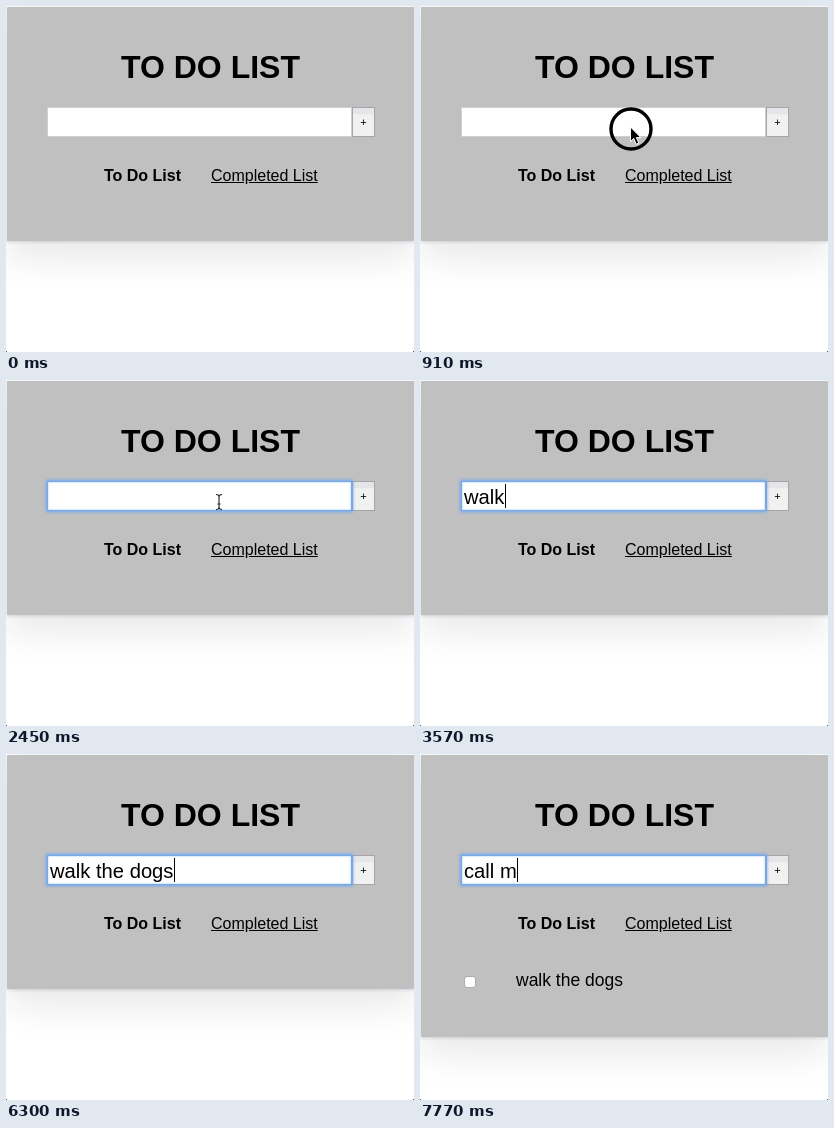
Animation, 408 px wide and 346 px high, one loop 8 s. Source, as an HTML page:

```html
<!DOCTYPE html>
<html lang="en">
<head>
<meta charset="utf-8">
<title>To do list</title>
<style>
  html, body { margin: 0; width: 100%; height: 100%; overflow: hidden; }
  body { background: #fff; font-family: "Liberation Sans", Arial, sans-serif; color: #000; }
  #stage { position: relative; width: 408px; height: 346px; overflow: hidden; }
  #stage * { position: absolute; box-sizing: border-box; white-space: pre; margin: 0; }
  #panel {
    left: 1px; top: 1px; width: 407px; height: 234px; background: #c0c0c0;
    box-shadow: 0 1px 3px rgba(30, 25, 45, .16), 0 16px 34px rgba(30, 25, 45, .1);
  }
  .added #panel { height: 282px; }
  h1 { left: 115px; top: 43px; font: bold 32px/36px "Liberation Sans", Arial, sans-serif; }
  .tab { top: 160px; font-size: 16px; line-height: 20px; }
  #todo { left: 98px; font-weight: bold; }
  #done { left: 205px; text-decoration: underline; }
  #add {
    left: 346px; top: 101px; width: 23px; height: 30px; border: 1px solid #a6a6a6;
    background: linear-gradient(#e6e6ea 20%, #f1f1f1 24%);
    font-size: 11px; line-height: 29px; text-align: center;
  }
  #field { left: 41px; top: 101px; width: 305px; height: 30px; background: #fff; border: 1px solid #cfcfcf; }
  .focus #field { border-color: #76a9ea; box-shadow: 0 0 3px 1px #6ea6ee, inset 0 0 2px #8fbcf2; }
  #line { left: 44px; top: 104px; height: 24px; display: flex; font-size: 20.2px; line-height: 26px; }
  #stage #line * { position: static; }
  #caret { width: 1px; height: 24px; margin-left: .6px; background: #000; visibility: hidden; }
  .item { visibility: hidden; }
  .added .item { visibility: visible; }
  #check { left: 44px; top: 222px; width: 12px; height: 12px; background: #fff; border: 1px solid #aaa; border-radius: 3px; }
  #label { left: 96px; top: 216px; font-size: 17.5px; line-height: 20px; }
  .corner { top: 345px; width: 1px; height: 1px; background: #555; }
  svg { left: 0; top: 0; }
</style>
</head>
<body>
<div id="stage">
  <div id="panel"></div>
  <h1>TO DO LIST</h1>
  <div id="add">+</div>
  <div id="field"></div>
  <div id="line"><span id="text"></span><i id="caret"></i></div>
  <div id="todo" class="tab">To Do List</div>
  <div id="done" class="tab">Completed List</div>
  <div id="check" class="item"></div>
  <div id="label" class="item">walk the dogs</div>
  <div class="corner" style="left:0"></div>
  <div class="corner" style="left:407px"></div>
  <svg width="408" height="346">
    <g id="pointer">
      <circle id="ring" r="20" fill="none" stroke="#000" stroke-width="3.4"/>
      <path id="arrow" d="M-.5-2V12.5L2.8 9.4 5.2 15.2 7.8 14.1 5.4 8.5H9.8Z" fill="#000" stroke="#fff" stroke-width="1"/>
      <path id="beam" d="M-3-7.5Q0-7.5 0-5Q0-7.5 3-7.5M0-5V5M-3 7.5Q0 7.5 0 5Q0 7.5 3 7.5M-1.5 2H1.5" fill="none" stroke="#222" stroke-width="1.1"/>
    </g>
  </svg>
</div>
<script>
const LOOP = 8000, STEP = 70, BLINK = 525;
const FOCUS = 1680, SUBMIT = 6370;
const $ = id => document.getElementById(id);
const show = (id, on) => { $(id).style.visibility = on ? "visible" : "hidden"; };

const entries = [
  { start: FOCUS, text: "walk the dogs",
    keys: [2590, 3150, 3220, 3570, 3780, 3850, 3990, 4060, 4200, 4340, 4480, 4690, 4830] },
  { start: SUBMIT, text: "call m", keys: [7210, 7350, 7420, 7560, 7630, 7770] }
];

const bezier = (a, b, c, d, u) => {
  const v = 1 - u;
  return a * v * v * v + 3 * b * v * v * u + 3 * c * v * u * u + d * u * u * u;
};

function pointerAt(t) {
  if (t >= 1050) return [213, 122];
  const p = Math.min((t - STEP) / 840, 1);
  const u = 1 - (1 - p) ** 1.6;
  return [bezier(277, 70, 87, 211, u), bezier(319, 150, -21, 123, u)];
}

function ringRadius(t) {
  if (t < 1050) return 20;
  if (t < 1470) return 16.3;
  return t < 1610 ? 15.5 : 14.8;
}

function drawPointer(t) {
  const typing = t >= entries[0].keys[0];
  const arrow = t >= STEP && t < 1190;
  show("ring", t >= STEP && t < 1750);
  show("arrow", arrow);
  show("beam", t >= 1190 && !typing);
  if (t < STEP || typing) return;
  const [x, y] = pointerAt(t);
  $("pointer").setAttribute("transform", `translate(${x} ${y})`);
  $("ring").setAttribute("r", ringRadius(t));
  $("arrow").setAttribute("transform", t >= 1050 ? "translate(-2 1)" : "");
}

function drawField(t) {
  const entry = entries[t < SUBMIT ? 0 : 1];
  const typed = entry.keys.filter(k => k <= t);
  const last = typed.length ? typed[typed.length - 1] : entry.start;
  $("text").textContent = entry.text.slice(0, typed.length);
  // Each key restarts the caret blink.
  show("caret", t >= FOCUS && Math.floor((t - last) / BLINK) % 2 === 0);
}

function frame() {
  const now = performance.now() % LOOP;
  const t = Math.floor(now / STEP) * STEP;
  $("stage").classList.toggle("focus", t >= FOCUS);
  $("stage").classList.toggle("added", t >= SUBMIT);
  drawPointer(t);
  drawField(t);
  requestAnimationFrame(frame);
}
frame();
</script>
</body>
</html>
```
